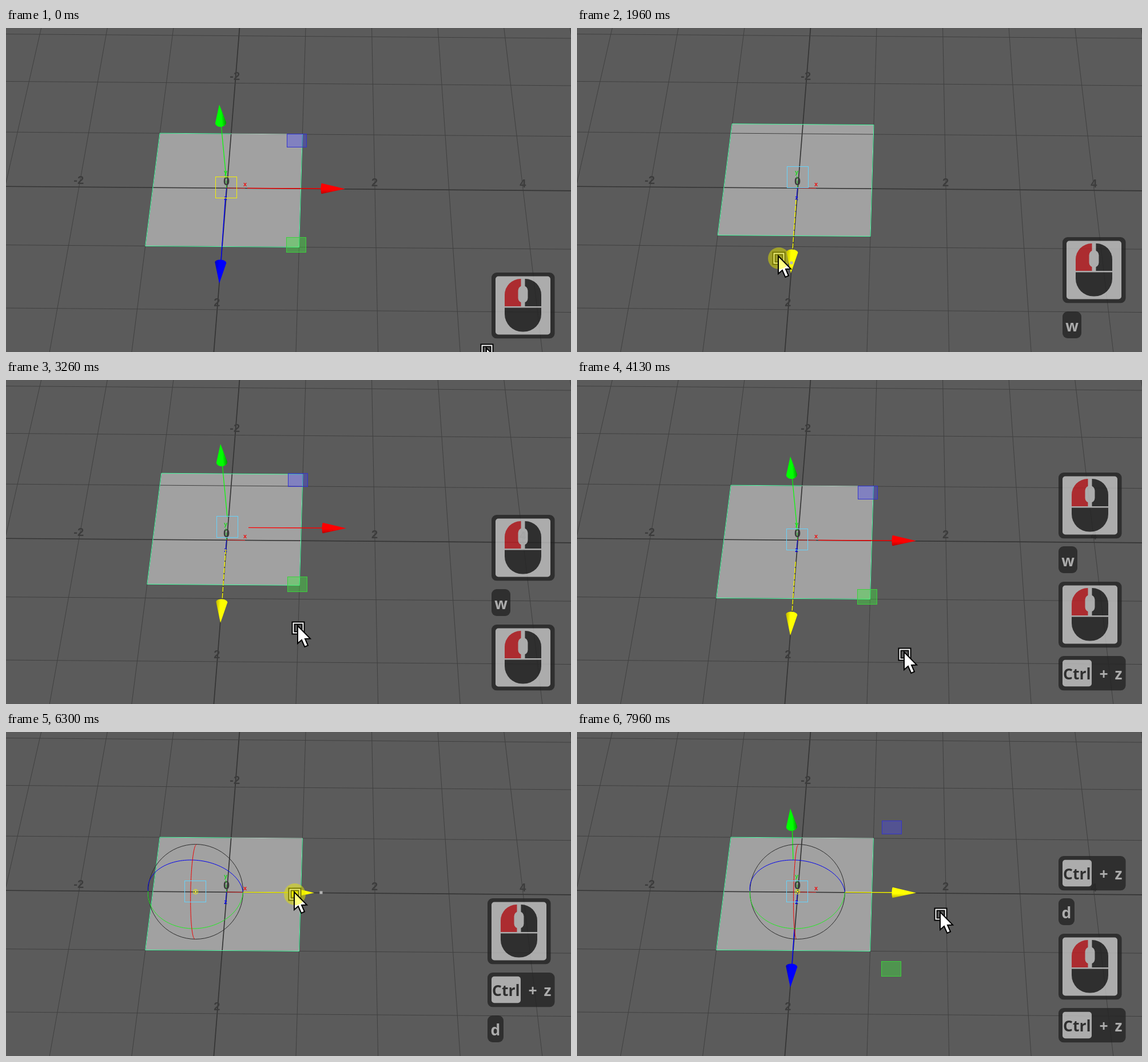
These frames come from a looping animation (988 by 567 pixels, 8 s). An HTML page with a canvas:

```html
<!DOCTYPE html>
<html lang="en">
<head>
<meta charset="utf-8">
<title>Move and pivot tools</title>
<style>
html, body { margin: 0; width: 100%; height: 100%; overflow: hidden; background: #5b5b5b; }
canvas { display: block; }
</style>
</head>
<body>
<canvas id="stage" width="988" height="567"></canvas>
<script>
const ctx = document.getElementById('stage').getContext('2d');
const W = 988, H = 567, LOOP = 8000, TICK = 108.8, TICK0 = 97;
const SANS = '"Liberation Sans", Arial, sans-serif';
const KEYFONT = '"Open Sans", "Noto Sans", sans-serif';

const T = {
  pressZ: 1395, dragZ: 1500, dropZ: 2850, undoZ: 3790, pivot: 4550,
  pressX: 5420, dragX: 5640, dropX: 6900, undoX: 7380
};

function ease(t, from, to) {
  if (t >= to) return 1;
  const k = Math.max(0, (t - from) / (to - from));
  return k * k * (3 - 2 * k);
}

// the plane creeps away, shoots back one cell and settles
const slideZ = t => .18 * ease(t, 1510, 1945) + .85 * ease(t, 1945, 2275) - .8 * ease(t, 2275, 2708);

// the pivot swings to and fro with less and less reach
function slideX(t) {
  const s = Math.min(1330, Math.max(0, t - T.pressX));
  return -105 * Math.exp(-s / 1800) * Math.sin(Math.PI * s / 380);
}

// pointer moves: start, end, x, y
const moves = [
  [0, 315, 686, 435], [750, 858, 614, 434], [858, 1390, 353, 421],
  [T.dropZ, T.dropZ, 353, 399], [T.dropZ, 3200, 511, 434], [3370, 3900, 612, 508],
  [3900, 4341, 536, 453], [4341, 4770, 498, 434], [5010, 5325, 559, 284],
  [T.dropX, T.dropX, 609, 284], [T.dropX, 7386, 690, 300], [7386, 7920, 636, 319]
];

function pointerAt(t) {
  let x = 841, y = 564;
  for (const [from, to, nx, ny] of moves) {
    if (t < from) break;
    const k = ease(t, from, to);
    x += (nx - x) * k;
    y += (ny - y) * k;
  }
  return [x, y];
}

// ground plane to screen
const colTop = c => 408.4 + 115.6 * c;
const colBottom = c => 363.4 + 143.6 * c;
const rowY = z => (280.2 + 88.4 * z) / (1 - .0365 * z);
const SLOPE = .0076;
function ground(c, z) {
  let x = 386, y = 0;
  for (let i = 0; i < 4; i++) {
    y = rowY(z) + SLOPE * (x - 386);
    x = colTop(c) + (colBottom(c) - colTop(c)) * y / H;
  }
  return [x, y];
}

function line(x1, y1, x2, y2, color, width = 1, dash = []) {
  ctx.beginPath();
  ctx.moveTo(x1, y1);
  ctx.lineTo(x2, y2);
  ctx.setLineDash(dash);
  ctx.strokeStyle = color;
  ctx.lineWidth = width;
  ctx.stroke();
  ctx.setLineDash([]);
}

function text(g, str, x, y, size, color, font) {
  g.font = 'bold ' + size + 'px ' + font;
  g.textAlign = 'center';
  g.textBaseline = 'alphabetic';
  g.fillStyle = color;
  g.fillText(str, x, y);
}

function label(c, z) {
  const [x, y] = ground(c, z);
  text(ctx, String(c || z), x - .5, y - 5.5, 20, '#3c3c3c', SANS);
}

function drawScene(z) {
  ctx.fillStyle = '#5b5b5b';
  ctx.fillRect(0, 0, W, H);
  const near = 1 - z, far = -1 - z;
  const p = [ground(-1, far), ground(0, far), ground(1, far), ground(1, near), ground(-1, near)];
  ctx.beginPath();
  p.forEach(q => ctx.lineTo(...q));
  ctx.fillStyle = '#a1a1a1';
  ctx.fill();

  const grid = i => i ? ['#404040', 1] : ['#353535', 1.7];
  for (let i = -3; i <= 5; i++) line(colTop(i), 0, colBottom(i), H, ...grid(i));
  for (let i = -3; i <= 2; i++) {
    line(0, rowY(i) - SLOPE * 386, W, rowY(i) + SLOPE * (W - 386), ...grid(i));
  }
  // a grid line dulls the far right edge while the plane rests on it
  p.forEach((q, i) => line(...q, ...p[(i + 1) % p.length], i === 1 && !z ? '#a9cdbb' : '#4bffa5'));

  for (const c of [-2, 0, 2, 4]) label(c, 0);
  for (const r of [-2, 2]) label(0, r);

  line(386, 280, 418, 280.5, '#d02020');
  line(385.5, 280, 384, 297, '#0000e8');
  line(385.5, 280, 384.5, 256, '#20d820', 1, [5, 3]);
  text(ctx, 'x', 418, 277, 11, '#f01010', SANS);
  text(ctx, 'y', 384, 256, 11, '#20d820', SANS);
  text(ctx, 'z', 384, 301, 11, '#0000e8', SANS);
}

const COLORS = {
  x: ['#ff0000', '#b40000'], y: ['#00ff00', '#009600'], z: ['#0000ff', '#0000c0'],
  on: ['#ffff00', '#b9b000']
};

// cone with base centre (bx, by), half width w and base depth d
function cone(bx, by, tx, ty, w, d, [light, dark]) {
  const a = Math.atan2(ty - by, tx - bx);
  ctx.save();
  ctx.translate(bx, by);
  ctx.rotate(a);
  const g = ctx.createLinearGradient(0, -w, 0, w);
  g.addColorStop(0, light);
  g.addColorStop(.6, light);
  g.addColorStop(1, dark);
  ctx.fillStyle = g;
  ctx.beginPath();
  ctx.moveTo(Math.hypot(tx - bx, ty - by), 0);
  ctx.lineTo(0, w);
  ctx.ellipse(0, 0, d, w, 0, Math.PI / 2, Math.PI * 1.5);
  ctx.closePath();
  ctx.fill();
  ctx.restore();
}

// part of an ellipse given by two conjugate radii around the pivot
function arc(ux, uy, vx, vy, color, span = Math.PI) {
  ctx.beginPath();
  for (let i = 0; i <= 64; i++) {
    const a = span * i / 64, c = Math.cos(a), s = Math.sin(a);
    ctx.lineTo(385.5 + ux * c + vx * s, 279.5 + uy * c + vy * s);
  }
  ctx.strokeStyle = color;
  ctx.lineWidth = 1;
  ctx.stroke();
}

function handle(x, y, w, h, fill, stroke) {
  ctx.fillStyle = fill;
  ctx.fillRect(x, y, w, h);
  ctx.strokeStyle = stroke;
  ctx.lineWidth = 1;
  ctx.strokeRect(x + .5, y + .5, w - 1, h - 1);
}

function drawGizmo(dx, dy, active, only, pivot) {
  const shown = a => !only || only === a;
  const tint = a => active === a ? COLORS.on : COLORS[a];
  ctx.save();
  ctx.translate(Math.round(dx), Math.round(dy));

  if (shown('y')) {
    line(376.5, 173, pivot ? 378 : 385, pivot ? 224 : 262, tint('y')[0], 1.2);
    cone(375.5, 166, 373, 134, 9.7, 7, tint('y'));
  }
  if (shown('z')) {
    const top = pivot ? 345 : active === 'z' ? 318 : 298;
    line(385 - (top - 280) * .076, top, 376, 407, tint('z')[0], 1.4, active === 'z' ? [9, 2] : []);
    cone(375.3, 410.5, 373, 447, 10, 5, tint('z'));
  }
  if (shown('x')) {
    line(pivot ? 469 : 422, 280.3, 551, 281, tint('x')[0], 1.3);
    cone(552, 281, 593, 281.4, 9.3, 1.5, tint('x'));
  }
  if (!only) {
    const blue = ['rgba(70,70,250,.35)', '#3434cc'], green = ['rgba(60,240,60,.38)', '#3cd03c'];
    handle(pivot ? 533 : 491, pivot ? 155 : 185, 35, 24, ...blue);
    handle(pivot ? 532 : 490, pivot ? 401 : 366, 35, 27, ...green);
  }
  if (pivot) {
    arc(83, 0, 0, 83, '#2b2b2b', Math.PI * 2);
    arc(83, 1, -7, -55.5, '#0000f0');
    arc(83, 1, -5, 64.5, '#20ee20');
    arc(1.5, -82.5, -6.8 + dx * .035, 0, '#f00000');
    ctx.beginPath();
    ctx.arc(385.5, 279.5, 4, 0, 7);
    ctx.strokeStyle = ctx.fillStyle = '#f4f400';
    ctx.stroke();
    ctx.fillRect(384, 278, 3, 3);
  }
  ctx.strokeStyle = active ? '#66d2fa' : '#f4f000';
  ctx.lineWidth = 1;
  ctx.strokeRect(366.5, 260.5, 37, 37);
  ctx.restore();

  // where the dragged handle started
  if (only) {
    const [x, y] = only === 'z' ? [375, 411] : [551, 281];
    ctx.fillStyle = '#b4b4b4';
    ctx.fillRect(x - 2.5, y - 2.5, 5, 5);
  }
}

function drawPointer(x, y, pressed) {
  ctx.save();
  ctx.translate(Math.round(x), Math.round(y));
  for (const [width, color] of [[6, '#000'], [2, '#fff']]) {
    ctx.lineWidth = width;
    ctx.strokeStyle = color;
    ctx.strokeRect(-8.5, -8.5, 17, 17);
  }
  let fill = '#fff';
  if (pressed) {
    ctx.fillStyle = 'rgba(225,225,0,.52)';
    ctx.beginPath();
    ctx.arc(0, 0, 19, 0, 7);
    ctx.fill();
    fill = ctx.createRadialGradient(0, 0, 0, 0, 0, 40);
    fill.addColorStop(.47, '#ffff82');
    fill.addColorStop(.49, '#fff');
  }
  ctx.beginPath();
  [[-1, -4], [-1, 27], [6, 21], [11.3, 33], [17, 30.5], [12, 19], [21, 18.5]]
    .forEach(q => ctx.lineTo(...q));
  ctx.closePath();
  ctx.fillStyle = fill;
  ctx.fill();
  ctx.lineWidth = 2;
  ctx.strokeStyle = '#000';
  ctx.stroke();
  ctx.restore();
}

// key history cards
const DARK = '#232323', LIGHT = '#c3c3c3', RED = '#c31f24';

function card(w, h, paint) {
  const c = document.createElement('canvas');
  c.width = Math.ceil(w);
  c.height = Math.ceil(h);
  const g = c.getContext('2d');
  const box = (x, y, bw, bh, r, color) => {
    g.beginPath();
    g.roundRect(x, y, bw, bh, r);
    g.fillStyle = color;
    g.fill();
  };
  box(0, 0, w, h, 9, DARK);
  paint(g, box);
  return { img: c, h };
}

const keyCard = (w, s) => card(w, 47, g => text(g, s, w / 2, 35, 26.5, LIGHT, KEYFONT));
const cards = {
  mouse: card(110.5, 115.3, (g, box) => {
    box(7, 6.5, 96, 102, 5, LIGHT);
    box(23, 11, 28.5, 48, [28, 0, 0, 0], RED);
    box(58.5, 11, 28.5, 48, [0, 28, 0, 0], DARK);
    box(46.5, 23, 17, 30, 8.5, LIGHT);
    box(23, 61.5, 64, 42, [0, 0, 31, 31], DARK);
  }),
  ctrl: card(117.5, 60.3, (g, box) => {
    box(7, 6.7, 51, 46.5, 5, LIGHT);
    text(g, 'Ctrl', 32.3, 41, 26.5, DARK, KEYFONT);
    text(g, '+', 79, 41, 26.5, LIGHT, KEYFONT);
    text(g, 'z', 105, 41, 26.5, LIGHT, KEYFONT);
  }),
  w: keyCard(33, 'w'),
  d: keyCard(28, 'd')
};

// name, shown from, shown until
const FADE = 400;
const history = [
  ['mouse', 0, 4985], ['w', 525, 5480], ['mouse', T.dropZ, 7800], ['ctrl', T.undoZ],
  ['d', T.pivot], ['mouse', T.dropX], ['ctrl', 7800]
];

function drawHistory(t) {
  const live = history.filter(([, from, to = Infinity]) => t >= from && t < to);
  const left = live.some(k => k[0] === 'ctrl') ? 842 : 849;
  let bottom = 543;
  for (const [name, , to = Infinity] of live.reverse()) {
    const c = cards[name];
    ctx.globalAlpha = .78 * Math.min(1, (to - t) / FADE);
    ctx.drawImage(c.img, left, Math.round(bottom - c.h));
    bottom -= c.h + 14.5;
  }
  ctx.globalAlpha = 1;
}

function draw(t) {
  const within = (a, b) => t >= a && t < b;
  const z = t < T.undoZ ? slideZ(t) : 0;
  const off = t < T.undoX ? slideX(t) : 0;
  const base = ground(0, 0), moved = ground(0, -z);
  const dx = moved[0] - base[0] + off;
  const dy = moved[1] - base[1] + off * SLOPE;

  const holdZ = within(T.pressZ, T.dropZ), holdX = within(T.pressX, T.dropX);
  const active = within(T.dragZ, T.pivot) ? 'z' : t >= T.pressX ? 'x' : '';
  const only = within(T.dragZ, T.dropZ) ? 'z' : within(T.dragX, T.dropX) ? 'x' : '';

  drawScene(z);
  drawGizmo(dx, dy, active, only, t >= T.pivot);
  drawHistory(t);

  const [x, y] = pointerAt(t);
  drawPointer(x + (holdX ? off : 0), y + (holdZ ? dy : 0), holdZ || holdX);
}

// the screen refreshes at a coarse, steady beat
function frame(now) {
  const t = now % LOOP;
  draw(t < TICK0 ? 0 : TICK0 + TICK * Math.floor((t - TICK0) / TICK));
  requestAnimationFrame(frame);
}
requestAnimationFrame(frame);
</script>
</body>
</html>
```
